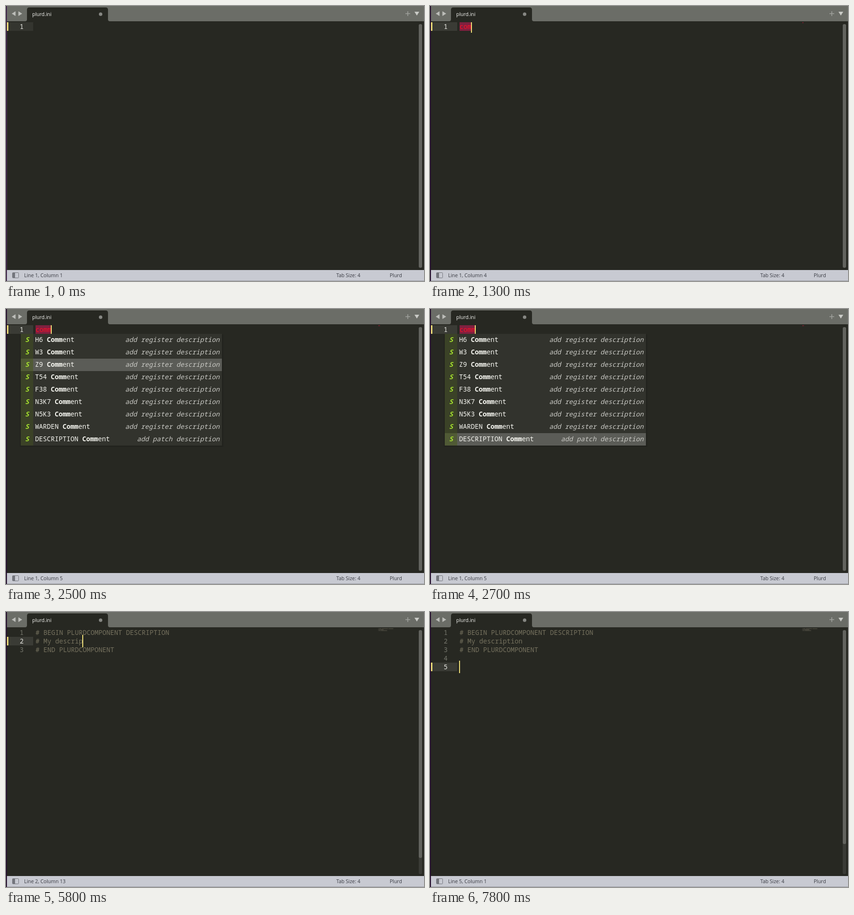
Recreate the animation shown at these times as an HTML page. Size 877 by 576 pixels, loop 8 s.

```html
<!DOCTYPE html>
<html lang="en">
<head>
<meta charset="utf-8">
<title>Editor completion</title>
<style>
  html, body { margin: 0; width: 100%; height: 100%; overflow: hidden; background: #272822; }
  svg { display: block; width: 877px; height: 576px; }
  text { white-space: pre; }
  .ui { font: 10.45px "Open Sans", "Noto Sans", sans-serif; fill: #383a42; }
  .code { font: 13.75px "Noto Sans Mono", "DejaVu Sans Mono", monospace; }
  .bold { font-weight: 700; }
  .italic { font-style: italic; }
</style>
</head>
<body>
<svg viewBox="0 0 877 576">
  <rect width="877" height="576" fill="#272822"/>
  <rect width="877" height="32" fill="#6b6d67"/>
  <path d="M40 32Q44 32 44 28V8Q44 3 49 3H209Q214 3 214 8V28Q214 32 218 32Z" fill="#272822"/>
  <path d="M20 11V21L12 16ZM26 11V21L34 16Z" fill="#bbbcb8"/>
  <text class="ui" x="55" y="21" style="fill:#f5f5f2">plurd.ini</text>
  <circle cx="198.5" cy="17.2" r="3.6" fill="#868783"/>
  <path d="M838 16H848M843 11V21" stroke="#a0a19d" stroke-width="1.6"/>
  <path d="M857 12H867L862 20Z" fill="#c9cac6"/>
  <rect x="866" y="38" width="7" height="511" rx="3" fill="#3a3b36"/>
  <g id="editor"></g>
  <rect y="553" width="877" height="23" fill="#c8cad2"/>
  <rect y="575" width="877" height="1" fill="#9a9ba3"/>
  <rect x="13.5" y="558.5" width="13" height="11" rx="1" fill="#c8cad2" stroke="#74767d"/>
  <rect x="14" y="559" width="5" height="10" fill="#74767d"/>
  <text class="ui" id="status" x="38" y="568"></text>
  <text class="ui" x="693" y="568">Tab Size: 4</text>
  <text class="ui" x="805" y="568">Plurd</text>
  <rect width="2" height="576" fill="#220b2b"/>
  <rect id="edge" x="1" width="1" height="576" fill="#553560"/>
</svg>
<script>
const LOOP = 8000, CELL = 8.25, LEFT = 62, TOP = 34, LINE = 18, ROW = 26;
const HEAD = '# BEGIN PLURDCOMPONENT DESCRIPTION', FOOT = '# END PLURDCOMPONENT ';
const HINT = 'Enter description here', WORDS = 'My description';
const ITEMS = ['H6', 'W3', 'Z9', 'T54', 'F38', 'N3K7', 'N5K3', 'WARDEN', 'DESCRIPTION'];

// [time, value] pairs in order; the last one reached counts
const typedQuery = [[0, 0], [1100, 1], [1200, 2], [1300, 3], [1400, 4]];
const pickedRow = [[0, -1], [1500, 0], [2100, 1], [2500, 2], [2600, 5], [2700, 8]];
const typedWords = [[0, 0], [3800, 1], [4000, 2], [4200, 3], [5000, 4], [5100, 5],
  [5300, 7], [5500, 8], [5600, 9], [5800, 10], [5900, 12], [6100, 13], [6200, 14]];
const cursorLine = [[0, 2], [6800, 3], [7500, 4], [7800, 5]];
const at = (keys, t) => keys.filter(k => k[0] <= t).pop()[1];

const $ = id => document.getElementById(id);
const rect = (x, y, w, h, fill, more = '') =>
  `<rect x="${x}" y="${y}" width="${w}" height="${h}" fill="${fill}" ${more}/>`;
const code = (x, y, s, fill, cls = '', anchor = 'start') =>
  `<text class="code ${cls}" x="${x}" y="${y}" fill="${fill}" text-anchor="${anchor}">${s}</text>`;

function stateAt(t) {
  if (t < 3000) {
    const query = 'comm'.slice(0, at(typedQuery, t));
    return { lines: [query], line: 1, col: query.length, invalid: true,
      caret: t >= 300, row: at(pickedRow, t) };
  }
  const selecting = t < 3800;
  const body = '# ' + (selecting ? HINT : WORDS.slice(0, at(typedWords, t)));
  const line = at(cursorLine, t);
  const lines = [HEAD, body, FOOT];
  while (lines.length < line) lines.push('');
  const col = t >= 7500 ? 0 : t >= 7000 ? FOOT.length : body.length;
  return { lines, line, col, caret: true, row: -1, selecting };
}

function minimap(lines, fill) {
  return lines.map((s, i) => [...s.matchAll(/\S+/g)].map(m =>
    rect(781 + m.index * .93, 34.3 + i * 2, m[0].length * .93, 1.3, fill)).join('')).join('');
}

function popup(picked) {
  const rows = ITEMS.map((name, i) => {
    const y = 52 + i * ROW, on = i === picked, base = y + 17;
    const detail = `add ${i < 8 ? 'register' : 'patch'} description`;
    return rect(31, y, 422, ROW, on ? '#5b5c57' : '#32332d') +
      rect(31, y, 26, ROW, on ? '#505a35' : '#3b4227') +
      code(40, base, 'S', '#a6e22e', 'bold italic') +
      code(61, base, `${name} <tspan class="bold">Comm</tspan>ent`, '#f8f8f2') +
      code(448, base, detail, '#c9c9c4', 'italic', 'end');
  });
  return rect(29, 53, 427, 236, '#22231e') + rows.join('');
}

function editor(s, t) {
  const top = TOP + (s.line - 1) * LINE, n = s.lines.length;
  let out = rect(2, top, 55, LINE, t < 300 ? '#34352f' : '#3a3b35') + rect(2, top, 3, LINE, '#efdf78');
  if (s.invalid && s.col) out += rect(LEFT, TOP, s.col * CELL, LINE, '#80203f');
  if (s.selecting) out += rect(LEFT + 2 * CELL, top, HINT.length * CELL, LINE, '#49483e');
  s.lines.forEach((str, i) => {
    const y = 48 + i * LINE;
    out += code(37, y, i + 1, i + 1 === s.line ? '#e8e8e2' : '#75766c', '', 'end');
    out += code(LEFT, y, str, s.invalid ? '#fa1027' : '#75715e');
  });
  if (s.caret) {
    const y = Math.max(TOP, top - 4);
    out += rect(61 + Math.round(s.col * CELL), y, 2, top + 22 - y, '#efdf78');
  }
  out += minimap(s.lines, s.invalid ? '#8c1f33' : '#504e44');
  out += rect(866, 38, 7, 510 * (n > 1 ? 1 - .0645 - (n - 3) * .0285 : 1), '#62635e', 'rx="3"');
  return s.row < 0 ? out : out + popup(s.row);
}

let shown = '';
function draw(now) {
  const t = now % LOOP, s = stateAt(t);
  const markup = editor(s, t);
  if (markup !== shown) {
    $('editor').innerHTML = shown = markup;
    $('status').textContent = s.selecting
      ? `${HINT.length} characters selected`
      : `Line ${s.line}, Column ${s.col + 1}`;
    $('edge').setAttribute('opacity', t < 300 ? 1 : 0);
  }
  requestAnimationFrame(draw);
}
draw(performance.now());
</script>
</body>
</html>
```
